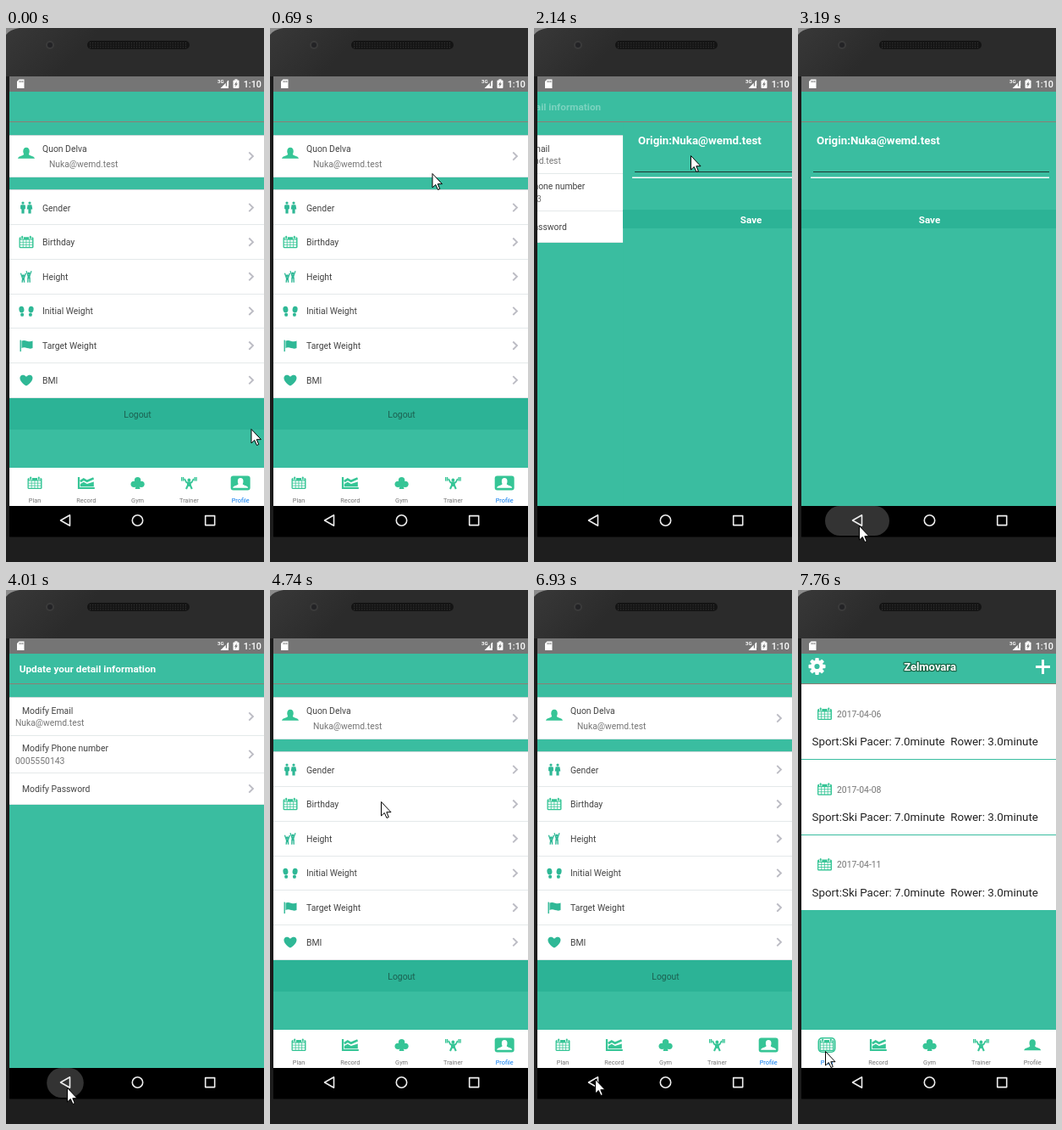
An HTML page with a canvas that plays this animation: 305 px wide and 629 px high, repeating every 8 s.

```html
<!DOCTYPE html>
<html lang="en">
<head>
<meta charset="utf-8">
<title>Fitness profile</title>
<style>
html, body { margin: 0; width: 100%; height: 100%; overflow: hidden; background: #222; }
canvas { display: block; width: 305px; height: 629px; }
</style>
</head>
<body>
<canvas id="stage"></canvas>
<script>
const canvas = document.getElementById('stage');
const g = canvas.getContext('2d');
const dpr = window.devicePixelRatio || 1;
canvas.width = 305 * dpr;
canvas.height = 629 * dpr;

const LOOP = 8000, LEFT = 4, WIDTH = 303, MID = 155.5, BOTTOM = 563;
const TEAL = '#3abda0', BUTTON = '#2cb396', ICON = '#2fb896', LIGHT = '#36c596';
const INK = '#434343', GREY = '#757575', BLUE = '#0a7cf0', EDGE = '#e4e9ea', BORDER = '#cbd8d8';
const MAIL = 'Nuka@wemd.test', PERSON = 'Quon Delva', PHONE = '0005550143';

// Bursts of screen updates: first, last, count
const bursts = [[0, 0, 1], [120, 690, 5], [970, 1210, 3], [1360, 1360, 1], [1630, 2650, 9],
  [2770, 3730, 8], [3880, 4440, 5], [4740, 5690, 7], [5850, 6810, 8], [6930, 7760, 7]];
// Page slides: start, lower page, upper page, opening
const slides = [[934, 'profile', 'detail', true], [2020, 'detail', 'edit', true],
  [3230, 'detail', 'edit', false], [3940, 'profile', 'detail', false],
  [5060, 'profile', 'edit', true], [6270, 'profile', 'edit', false]];
const PLAN_AT = 7480;
const presses = [[540, 685, 'profile', 126, 50], [1880, 2010, 'detail', 126, 45], [4890, 5050, 'profile', 232, 40]];
const ripples = [[3040, 3440], [3870, 4200], [6100, 6500]];
const path = [[60, 289.5, 472], [480, 200, 168], [680, 191.5, 171], [1500, 191.5, 171],
  [1860, 185, 150], [2380, 185, 150], [2650, 125, 457], [2910, 78, 578], [3044, 72, 586],
  [4700, 72, 586], [4735, 131, 249], [5250, 131, 249], [5690, 95, 520], [5850, 77, 576],
  [5980, 75, 582], [6810, 75, 582], [6930, 72, 576], [7000, 72, 576], [7300, 32, 543]];

const clamp = v => Math.max(0, Math.min(1, v));

function box(x, y, w, h, color) {
  g.fillStyle = color;
  g.fillRect(x, y, w, h);
}
function pill(x, y, w, h, r, color) {
  g.fillStyle = color;
  g.beginPath();
  g.roundRect(x, y, w, h, r);
  g.fill();
}
function dot(x, y, rx, ry, color, turn = 0) {
  g.fillStyle = color;
  g.beginPath();
  g.ellipse(x, y, rx, ry, turn, 0, 7);
  g.fill();
}
function trace(points, close) {
  g.beginPath();
  points.forEach(([x, y]) => g.lineTo(x, y));
  if (close) g.closePath();
}
function poly(points, color) {
  g.fillStyle = color;
  trace(points, true);
  g.fill();
}
function line(points, color, width, close) {
  g.strokeStyle = color;
  g.lineWidth = width;
  trace(points, close);
  g.stroke();
}
function text(str, x, y, size, color, weight = 400, align = 'left') {
  g.font = `${weight} ${size}px Roboto, sans-serif`;
  g.textAlign = align;
  g.fillStyle = color;
  g.fillText(str, x, y);
}
function at(x, y, draw, ...args) {
  g.save();
  g.translate(x, y);
  draw(...args);
  g.restore();
}

// Icons, centred on the origin
function calendar() {
  pill(-8.5, -6, 17, 13, 1.5, LIGHT);
  [-4.8, 4.8].forEach(x => {
    box(x - 1.7, -6, 3.4, 2.4, '#fff');
    pill(x - 0.9, -7.5, 1.8, 3.6, 0.8, LIGHT);
  });
  for (let i = 0; i < 12; i++) box(-7.2 + (i % 4) * 3.75, -2.5 + Math.floor(i / 4) * 3, 3, 2.2, '#fff');
}
function person(color = LIGHT, size = 1) {
  g.scale(size, size);
  dot(0, -2.3, 3.7, 4.5, color);
  g.fillStyle = color;
  g.beginPath();
  g.moveTo(-10, 6.3);
  g.bezierCurveTo(-9.5, 2.6, -3, 4, -2.4, 0);
  g.lineTo(2.4, 0);
  g.bezierCurveTo(3, 4, 9.5, 2.6, 10, 6.3);
  g.fill();
}
function couple() {
  [-4, 4].forEach((x, i) => {
    dot(x, -5.4, 1.6, 1.6, ICON);
    if (i) poly([[x - 2.4, -3.3], [x + 2.4, -3.3], [x + 3.3, 2], [x - 3.3, 2]], ICON);
    else pill(x - 2.9, -3.3, 5.8, 5.3, 1.3, ICON);
    box(x - 1.6, 1, 3.2, 6, ICON);
  });
}
function reach() {
  [[-3.6, -1, 0.85], [3, -3.6, 1]].forEach(([x, y, s]) => {
    dot(x, y, 1.6, 1.6, ICON);
    line([[x - 3, y - 3], [x - 1, y + 2.5], [x + 1, y + 2.5], [x + 3, y - 3]], ICON, 1.3);
    box(x - 1.5, y + 2, 3, 4 * s, ICON);
    [-1, 1].forEach(d => line([[x + d, y + 5], [x + d * 1.2, 7]], ICON, 1.4));
  });
}
function feet() {
  [-1, 1].forEach(s => {
    dot(s * 5.6, -2, 3, 3.8, ICON, s * 0.15);
    dot(s * 4.9, 4.2, 2, 2.2, ICON);
  });
}
function flag() {
  box(-7.5, -6.5, 1.4, 13.5, ICON);
  g.fillStyle = ICON;
  g.beginPath();
  g.moveTo(-5.5, -5.5);
  g.bezierCurveTo(-1, -8, 2, -3, 7.5, -5.5);
  g.lineTo(7.5, 3);
  g.bezierCurveTo(2, 5, -1, 0.5, -5.5, 3);
  g.fill();
}
function heart() {
  g.fillStyle = ICON;
  g.beginPath();
  g.moveTo(0, 6.8);
  g.bezierCurveTo(-14, -2, -5, -10, 0, -4);
  g.bezierCurveTo(5, -10, 14, -2, 0, 6.8);
  g.fill();
}
function chart() {
  line([[-8.8, -7], [-8.8, 6], [10, 6]], LIGHT, 2.2);
  poly([[-7, 4.2], [-7, 1], [-3, -1.2], [1, 1], [9, -1.5], [9, 4.2]], LIGHT);
  line([[-7, -1.8], [-3, -4.4], [1, -2.2], [8.8, -5.6]], LIGHT, 2.6);
}
function club() {
  dot(0, -3.4, 3.7, 3.7, LIGHT);
  [-4.2, 4.2].forEach(x => dot(x, 1.3, 3.9, 3.6, LIGHT));
  poly([[-1, 0], [1, 0], [3, 7], [-3, 7]], LIGHT);
}
function lifter() {
  dot(0, -3.4, 1.9, 2.1, LIGHT);
  line([[-5.5, -5], [-3, -0.6], [3, -0.6], [5.5, -5]], LIGHT, 1.7);
  box(-2.4, -1.2, 4.8, 5, LIGHT);
  line([[-3.4, 7], [-1.4, 2.5], [1.4, 2.5], [3.4, 7]], LIGHT, 2.1);
  [-9.4, -7.5, 6.1, 8].forEach(x => box(x, -7, 1.4, 4.6, LIGHT));
}
function gear() {
  for (let i = 0; i < 8; i++) {
    g.rotate(Math.PI / 4);
    pill(-2.2, -10, 4.4, 6, 1, '#fff');
  }
  dot(0, 0, 7.4, 7.4, '#fff');
  dot(0, 0, 3.1, 3.1, TEAL);
}

function chevron(y) {
  line([[287.3, y - 4.6], [292, y], [287.3, y + 4.6]], '#bcbcc4', 1.9);
}
function row(y, h) {
  box(LEFT, y, WIDTH, h, '#fff');
  box(LEFT, y + h - 1, WIDTH, 1, EDGE);
}
function topBorder(y) {
  box(LEFT, y, WIDTH, 1, BORDER);
}
function pressed(page, t) {
  presses.forEach(([from, to, name, y, h]) => {
    if (name === page && t >= from && t < to) box(LEFT, y, WIDTH, h, '#e9e9e9');
  });
}
function tabs(active) {
  box(LEFT, 518, WIDTH, BOTTOM - 518, '#fff');
  const icons = [calendar, chart, club, lifter, person];
  ['Plan', 'Record', 'Gym', 'Trainer', 'Profile'].forEach((name, i) => {
    const x = 34 + i * 60.8, on = i === active;
    if (on && i === 4) {
      pill(x - 11.5, 527.5, 23, 17, 3, LIGHT);
      at(x, 536, person, '#fff', 0.9);
    } else {
      if (on) {
        pill(x - 10.5, 527, 21, 18, 5, LIGHT);
        pill(x - 9, 528.5, 18, 15, 4, '#fff');
      }
      at(x, 536, icons[i]);
    }
    text(name, x, 559, 7.4, on ? BLUE : GREY, 400, 'center');
  });
}

const pages = {
  profile(t) {
    row(126, 50);
    row(190, 246);
    pressed('profile', t);
    topBorder(126);
    topBorder(190);
    at(24, 147.5, person);
    text(PERSON, 43, 146, 10.4, INK);
    text(MAIL, 51, 164, 10.3, GREY);
    chevron(151);
    const items = [['Gender', couple], ['Birthday', calendar], ['Height', reach],
      ['Initial Weight', feet], ['Target Weight', flag], ['BMI', heart]];
    items.forEach(([name, icon], i) => {
      const y = 211.5 + i * 40.65;
      at(24, y, icon);
      text(name, 43, y + 4, 10.4, INK);
      chevron(y);
      if (i < 5) box(LEFT, Math.round(y + 19.9), WIDTH, 1, EDGE);
    });
    box(LEFT, 436, WIDTH, 37, BUTTON);
    text('Logout', MID, 458.5, 10.4, '#1c5f50', 400, 'center');
    tabs(4);
  },
  detail(t) {
    row(126, 46);
    row(172, 44);
    row(216, 37);
    pressed('detail', t);
    topBorder(126);
    text('Modify Email', 19, 146, 10.4, INK);
    text(MAIL, 11, 160, 10.3, GREY);
    text('Modify Phone number', 19, 190, 10.4, INK);
    text(PHONE, 11, 204.5, 10.4, GREY);
    text('Modify Password', 19, 238, 10.4, INK);
    [149, 193.5, 234].forEach(chevron);
  },
  edit() {
    text('Origin:' + MAIL, 22, 136.5, 13.3, '#fff', 700);
    box(18, 169, 279, 1, '#1d3a34');
    box(15, 175.5, 282, 1.5, '#fff');
    box(LEFT, 214, WIDTH, 22, BUTTON);
    text('Save', MID, 230, 11.7, '#fff', 700, 'center');
  },
  plan() {
    ['06', '08', '11'].forEach((day, i) => {
      const y = 111 + i * 88.7;
      box(LEFT, 111 + i * 89, WIDTH, 88, '#fff');
      at(31.5, y + 35, calendar);
      text('2017-04-' + day, 46, y + 39, 10.4, GREY);
      text('Sport:Ski Pacer: 7.0minute  Rower: 3.0minute', 16.5, y + 72.3, 13.35, '#222');
    });
    tabs(0);
  }
};

function page(name, dx, t) {
  g.save();
  g.translate(dx, 0);
  box(LEFT, 111, WIDTH, BOTTOM - 111, TEAL);
  pages[name](t);
  g.restore();
}
function title(shift, alpha) {
  g.globalAlpha = clamp(alpha);
  text('Update your detail information', 15.7 + shift * 147, 97, 11.8, '#fff', 700);
  g.globalAlpha = 1;
}
function planHeader() {
  at(22.5, 90, gear);
  box(281, 89, 17, 3, '#fff');
  box(288, 82, 3, 17, '#fff');
  g.font = '700 13px Roboto, sans-serif';
  g.textAlign = 'center';
  g.lineJoin = 'round';
  g.lineWidth = 2.6;
  g.strokeStyle = '#1d6a4b';
  g.strokeText('Zelmovara', 156, 95);
  text('Zelmovara', 156, 95, 13, '#fff', 700, 'center');
}

function screen(t) {
  g.save();
  g.beginPath();
  g.rect(LEFT, 57, 301, BOTTOM - 57);
  g.clip();
  box(LEFT, 57, WIDTH, BOTTOM - 57, TEAL);
  if (t >= PLAN_AT) {
    page('plan', 0, t);
    planHeader();
  } else {
    const [start, low, high, opening] = slides.filter(s => s[0] <= t).pop() || [-1000, 'profile', 'edit', false];
    const rest = (1 - clamp((t - start) / 500)) ** 4;
    const p = opening ? 1 - rest : rest;
    if (p < 1) page(low, -0.3 * WIDTH * p, t);
    if (p > 0) page(high, WIDTH * (1 - p), t);
    if (high === 'detail') title(1 - p, p);
    if (low === 'detail') title(-p, 1 - p);
  }
  box(LEFT, 110, WIDTH, 1, '#8f7d74');
  statusBar();
  g.restore();
}
function statusBar() {
  box(LEFT, 57, WIDTH, 18, '#757575');
  poly([[15.5, 60.5], [21.5, 60.5], [21.5, 71], [13, 71], [13, 63]], '#fff');
  [15.6, 17.5, 19.4].forEach(x => box(x, 62, 0.9, 2.2, '#757575'));
  text('3G', 250, 65, 6, '#fff', 700);
  poly([[263, 61.5], [263, 71], [253.5, 71]], '#fff');
  box(259.8, 60.5, 1.3, 8, '#757575');
  box(262, 62, 1.2, 6, '#fff');
  pill(268.5, 61.5, 7, 9.5, 1, '#fff');
  box(270.5, 60.3, 3, 1.5, '#fff');
  poly([[272.8, 62.8], [270, 66.8], [271.6, 66.8], [271, 69.6], [274, 65.6], [272.3, 65.6]], '#757575');
  text('1:10', 302, 70, 10.8, '#fff', 500, 'right');
}

function phone() {
  box(0, 0, 305, 629, '#1e1e1e');
  const shade = g.createLinearGradient(0, 0, 60, 57);
  shade.addColorStop(0, '#383838');
  shade.addColorStop(1, '#2b2b2b');
  box(0, 0, 305, 57, shade);
  box(0, 57, 4, 542, '#1c1c1c');
  g.fillStyle = '#8c8c8c';
  g.beginPath();
  g.moveTo(0, 0);
  g.lineTo(16, 0);
  g.quadraticCurveTo(4, 2, 0, 8);
  g.fill();
  dot(52, 20, 5, 5, '#3b3b3b');
  dot(52, 20, 3, 3, '#232326');
  pill(96, 15, 121, 10, 5, '#141414');
  for (let i = 0; i < 114; i++) box(99 + (i % 38) * 3.05, 17 + Math.floor(i / 38) * 2.6, 1.2, 1.2, '#343434');
}
function navBar(t) {
  box(LEFT, BOTTOM, WIDTH, 36.5, '#000');
  ripples.forEach(([from, to]) => {
    if (t < from || t > to) return;
    const half = 20 + 18 * clamp((t - from) / 100);
    g.globalAlpha = clamp((to - t) / 200);
    pill(70 - half, BOTTOM, half * 2, 35, 17.5, '#333');
    g.globalAlpha = 1;
  });
  g.lineJoin = 'round';
  line([[64.5, 580], [75.5, 573.8], [75.5, 586.2]], '#eee', 1.6, true);
  g.beginPath();
  g.arc(MID, 580, 6.2, 0, 7);
  g.stroke();
  g.strokeRect(235.7, 574.6, 11, 11);
  g.lineJoin = 'miter';
}
function cursor(t) {
  let i = path.findIndex(k => k[0] > t);
  if (i < 0) i = path.length;
  const a = path[Math.max(0, i - 1)], b = path[Math.min(i, path.length - 1)];
  const u = b[0] > a[0] ? clamp((t - a[0]) / (b[0] - a[0])) : 0;
  const k = u * u * (3 - 2 * u);
  const arrow = [[0, 0], [0, 16.5], [3.8, 13], [6.5, 19], [8.8, 18], [6.3, 12.2], [11.5, 12.2]];
  at(a[1] + (b[1] - a[1]) * k + 0.5, a[2] + (b[2] - a[2]) * k + 0.5, () => {
    poly(arrow, '#fff');
    line(arrow, '#000', 1, true);
  });
}

function hold(t) {
  let shown = 0;
  bursts.forEach(([from, to, n]) => {
    for (let i = 0; i < n; i++) {
      const s = Math.floor(from + (n > 1 ? (to - from) * i / (n - 1) : 0));
      if (s <= t) shown = s;
    }
  });
  return shown;
}
function frame() {
  const t = hold(performance.now() % LOOP);
  g.setTransform(dpr, 0, 0, dpr, 0, 0);
  phone();
  screen(t);
  navBar(t);
  cursor(t);
  requestAnimationFrame(frame);
}
frame();
</script>
</body>
</html>
```
